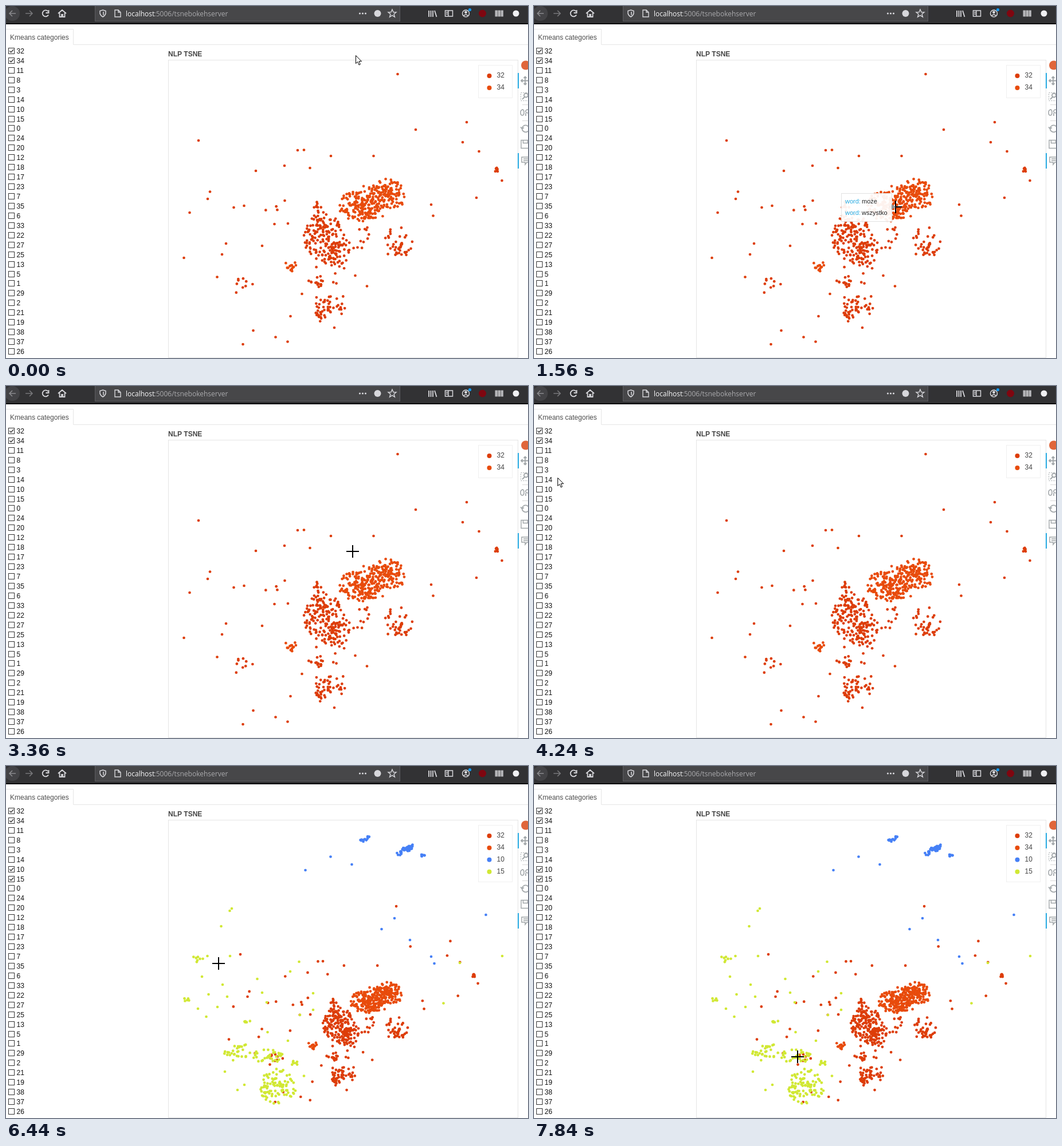
An HTML page with a canvas for the animation above (8 s loop, 911x615 px).

```html
<!DOCTYPE html>
<html lang="en">
<head>
<meta charset="utf-8">
<title>NLP TSNE</title>
<style>
html, body { margin: 0; width: 100%; height: 100%; overflow: hidden; background: #fff; }
canvas { display: block; }
</style>
</head>
<body>
<canvas id="stage" width="911" height="615"></canvas>
<script>
const ctx = document.getElementById('stage').getContext('2d');
const LOOP = 8000, STEP = 40, TAU = Math.PI * 2;
const SANS = '"Liberation Sans", Arial, sans-serif';
const COLORS = { 32: '#dd3d08', 34: '#e84b0c', 10: '#4680f6', 15: '#d1e834' };
const LABELS = '32 34 11 8 3 14 10 15 0 24 20 12 18 17 23 7 35 6 33 22 27 25 13 5 1 29 2 21 19 38 37 26'.split(' ');

// Axis ranges as [x offset, x scale, y offset, y scale]
const VIEWS = [
  [0, 1, 0, 1],
  [10.84, 0.9651, 159, 0.731],
  [145.9, 0.783, 158.8, 0.7246]
];

// When each category is ticked, and when its points arrive
const TICKS = { 32: 0, 34: 0, 10: 4880, 15: 5640 };
const ARRIVE = { 32: 0, 34: 0, 10: 5000, 15: 5720 };

// Loose points, x and y in turn
const LOOSE_RED = [
  683.5,119, 715,216, 804,203, 797,238, 825.5,254, 865.5,305, 821,335, 742,347, 745.5,366.5,
  641.5,262, 567,262, 509,252, 520,251.5, 486,279, 530.5,283, 436,288, 356,324.5, 352,337,
  397.5,352, 415.5,349, 486.5,340, 320.5,361, 468.5,381, 492,380, 384,415, 447,419, 377,434,
  310.5,440, 368.5,473.5, 516.5,503, 609.5,471, 630,489.5, 496.5,542, 431.5,567, 470.5,578.5,
  491.5,586.5, 413.5,591, 573,562, 336,235
];
const LOOSE_BLUE = [522.5,182, 566.5,158.5, 603.5,172, 678,266, 655.5,285, 705,304, 742,333, 747.5,345, 837.5,260];
const LOOSE_LIME = [
  394,249, 390.5,253, 375.5,280, 351.5,332, 391,332, 342,368, 378,382, 353.5,399, 369,421,
  335,424, 349.5,438, 386,403, 438.5,372, 447,396, 455,413, 511.5,342, 496,359, 536,397,
  536,426, 513,435, 866,332, 792,344, 763.5,414.5, 456.5,465, 492,480, 382,534, 416,557,
  404,566, 520,541.5
];

// Clouds: centre, radii, count
const CLOUDS = {
  32: [
    [558, 408, 40, 42, 145], [578, 432, 22, 20, 34], [545, 365, 14, 26, 22], [684, 413, 26, 28, 40],
    [548, 486, 9, 7, 11], [554, 526, 19, 26, 40], [584, 520, 8, 20, 10], [555, 468, 45, 20, 12],
    [622, 400, 32, 28, 12], [412, 488, 20, 22, 9], [464, 354, 12, 6, 3], [856, 287, 4, 5, 8]
  ],
  34: [[620, 349, 40, 28, 150], [664, 329, 34, 27, 100], [645, 342, 50, 30, 50], [497, 456, 12, 14, 15]],
  10: [[627, 127, 11, 4, 16], [696, 147, 15, 6, 44], [727, 156, 5, 2, 7]],
  15: [
    [405, 500, 24, 16, 28], [458, 507, 27, 13, 32], [475, 560, 33, 31, 95], [503, 520, 9, 5, 7],
    [334, 339, 11, 7, 7], [315, 408, 5, 4, 5], [421, 446, 8, 2, 5]
  ]
};

// Pointer path: time, x, y
const PATH = [
  [0, 610, 86], [40, 610, 86], [800, 626, 343], [1320, 626, 343], [1560, 631, 351],
  [1840, 646, 361], [2160, 662, 340], [2360, 668, 340], [3000, 681, 322], [3040, 681, 322],
  [3200, 684, 314], [3880, 299, 200], [4240, 41, 160], [4520, 8, 181], [5080, 8, 181],
  [5560, 10, 197], [5920, 10, 197], [6440, 371, 345], [6760, 460, 499], [6960, 428, 506],
  [7240, 456, 507], [7680, 456, 507], [7840, 460, 508], [8000, 460, 508]
];

// Hover tips: start, end, words
const TIPS = [
  [720, 1720, ['może', 'wszystko']],
  [2040, 2680, ['z', 'przed']],
  [6880, 7840, ['człowiek']]
];

let seed = 11;
function random() {
  seed = (seed * 16807) % 2147483647;
  return seed / 2147483647;
}

function makePoints() {
  const sets = { 32: [], 34: [], 10: [], 15: [] };
  // Blue and lime are given in the last view, so they are mapped back
  const add = (cat, x, y) => {
    const [ox, sx, oy, sy] = VIEWS[cat < 20 ? 2 : 0];
    sets[cat].push([(x - ox) / sx, (y - oy) / sy]);
  };
  const addAll = (cat, list) => {
    for (let i = 0; i < list.length; i += 2) add(cat, list[i], list[i + 1]);
  };
  addAll(32, LOOSE_RED);
  addAll(10, LOOSE_BLUE);
  addAll(15, LOOSE_LIME);
  for (const cat in CLOUDS) {
    for (const [cx, cy, rx, ry, n] of CLOUDS[cat]) {
      // Blue clouds lean, except the low flat one
      const lean = cat === '10' && ry > 2 ? -0.5 : 0;
      for (let i = 0; i < n; i++) {
        const a = random() * TAU, r = random() ** 0.6;
        const u = Math.cos(a) * r * rx, v = Math.sin(a) * r * ry;
        add(cat, cx + u, cy + v + u * lean);
      }
    }
  }
  return sets;
}
const POINTS = makePoints();

function rect(x, y, w, h, fill) {
  ctx.fillStyle = fill;
  ctx.fillRect(x, y, w, h);
}
function frame(x, y, w, h, color, width = 1) {
  ctx.strokeStyle = color;
  ctx.lineWidth = width;
  ctx.strokeRect(x, y, w, h);
}
function dot(x, y, r, fill) {
  ctx.fillStyle = fill;
  ctx.beginPath();
  ctx.arc(x, y, r, 0, TAU);
  ctx.fill();
}
function text(s, x, y, color, font = '12px ' + SANS) {
  ctx.font = font;
  ctx.fillStyle = color;
  ctx.fillText(s, x, y);
}
function path(d, color, width = 1.6, x = 0, y = 0) {
  ctx.save();
  ctx.translate(x, y);
  ctx.strokeStyle = color;
  ctx.lineWidth = width;
  ctx.stroke(new Path2D(d));
  ctx.restore();
}

function drawBrowser() {
  const light = '#d7d7db', dim = '#77777a';
  rect(0, 0, 911, 31, '#323234');
  rect(0, 30, 911, 2, '#0c0c0d');
  rect(155, 0, 533, 27, '#5c5c61');
  rect(156, 0, 531, 26, '#474749');
  dot(11, 13, 13, '#434346');
  path('M16 0H5M10-5L5 0l5 5', '#8b8b8e', 1.6, 1, 13);
  path('M-6 0H6M1-5L6 0L1 5', dim, 1.6, 40, 13);
  path('M4.5-3.5A5.5 5.5 0 1 0 5 2.5M5.5-6v5h-5', light, 1.8, 69, 13);
  path('M-7 0L0-6L7 0M-4.5-1V6H-1V2H1V6H4.5V-1', light, 1.8, 98, 13);
  path('M0-6L5-4.5V0Q4 4 0 6Q-4 4-5 0V-4.5Z M1-3v6', light, 1.5, 169, 13);
  path('M-5-6H1L5-2V6H-5ZM1-6V-2H5', light, 1.4, 195, 13);
  const url = '12px "Open Sans", "Noto Sans", sans-serif';
  text('localhost', 209, 18, '#f9f9fa', url);
  text(':5006/tsnebokehserver', 258.5, 18, '#aaaaad', url);
  for (let i = 0; i < 3; i++) dot(617.5 + i * 5, 13, 1.6, light);
  dot(648.5, 13, 6, light);
  path('M0-7L2-2.2L7-2L3 1.3L4.4 6.2L0 3.4L-4.4 6.2L-3 1.3L-7-2L-2-2.2Z', light, 1.4, 674, 13);
  path('M-6-5V6M-2.5-5V6M1-5V6M4-5L7.5 6', light, 1.8, 744, 13);
  path('M-6.5-5h13v10h-13ZM-1-5V5M-5-2h3M-5 1h3', light, 1.5, 773, 13);
  path('M6 0A6 6 0 1 1-6 0A6 6 0 1 1 6 0M-3.5 4Q0 0 3.5 4', light, 1.5, 802.5, 13);
  dot(802.5, 11, 2.4, light);
  dot(809.5, 6.5, 2.6, '#1299f4');
  dot(831.5, 13, 6.5, '#800610');
  for (let i = 0; i < 3; i++) rect(853.5 + i * 5, 7.5, 4.4, 11, '#b5b5b8');
  dot(890, 13, 5.5, '#f0f0f2');
}

function drawList(t, px, py) {
  path('M0 40.5H117.5V67.5H911', '#e6e6e6', 1);
  text('Kmeans categories', 7, 59, '#4d4d4d');
  LABELS.forEach((label, i) => {
    const y = Math.round(73 + i * 16.935);
    const hover = px > 3 && px < 16 && py >= y && py <= y + 12;
    const color = hover ? '#0078d7' : '#333';
    rect(4, y, 11, 11, '#fff');
    frame(4.5, y + 0.5, 10, 10, color);
    if (t >= TICKS[label]) path('M2.5 5.5L4.7 8L9 3', color, 1.3, 4, y);
    text(label, 18.5, y + 10, '#111');
  });
}

function drawPlot(t) {
  const [ox, sx, oy, sy] = VIEWS[t >= ARRIVE[15] ? 2 : t >= ARRIVE[10] ? 1 : 0];
  const shown = ['32', '34', '10', '15'].filter(cat => t >= ARRIVE[cat]);
  text('NLP TSNE', 283, 88, '#444', 'bold 12px ' + SANS);
  frame(283.5, 94.5, 610, 520, '#e5e5e5');
  for (const cat of shown) {
    for (const [x, y] of POINTS[cat]) dot(ox + x * sx, oy + y * sy, 2.35, COLORS[cat]);
  }
  const h = 15 + shown.length * 21;
  rect(825, 103, 59, h, 'rgba(255,255,255,.95)');
  frame(824.5, 103.5, 59, h, '#f0f0f0');
  shown.forEach((cat, i) => {
    dot(843.5, 122 + i * 20.9, 4, COLORS[cat]);
    text(cat, 856.5, Math.round(125 + i * 20.9), '#444');
  });
}

function drawTools() {
  const gray = '#a1a6a9';
  dot(907, 103.5, 8, '#e0663a');
  rect(893, 117, 2, 27, '#26aae1');
  rect(893, 257, 2, 27, '#26aae1');
  rect(901, 172, 10, 1, '#d8d8d8');
  rect(901, 200, 10, 1, '#d8d8d8');
  path('M-7 0H7M0-7V7M-4.5-2.5L-7 0L-4.5 2.5M-2.5-4.5L0-7L2.5-4.5M-2.5 4.5L0 7L2.5 4.5', gray, 1.8, 906, 130.5);
  ctx.setLineDash([2, 2]);
  frame(898.5, 151.5, 14, 14, gray);
  ctx.setLineDash([]);
  path('M4 0A3.5 3.5 0 1 1-3 0A3.5 3.5 0 1 1 4 0M-2 3L-6 7', gray, 1.8, 907, 156);
  path('M-1-5Q-6-5-6 0Q-6 5-3 5Q0 5 0 0Q0-5-3-5M3 6V1M8-5Q2-5 3-1Q4 1 8 1', gray, 1.6, 904, 186);
  path('M6-3A6 6 0 1 0 5 4M-8-3L-5.5 0L-2-2', gray, 1.7, 906, 214.5);
  path('M-6.5-7H7V7H-6.5ZM-3-7V-2H5V-7', gray, 1.4, 905.5, 241.5);
  path('M-6-6H7V3H3L0 7V3H-6ZM-3-3H7M-3 0H7', gray, 1.5, 906, 270);
}

function drawTip(words, x, y) {
  const font = '11px ' + SANS;
  ctx.font = font;
  const w = Math.round(43 + Math.max(...words.map(s => ctx.measureText(s).width)));
  const h = words.length * 19.5 + 10;
  const right = x < 588;
  const left = Math.round(right ? x + 7 : x - 7 - w), top = Math.round(y - h / 2);
  rect(left, top, w, h, 'rgba(255,255,255,.93)');
  frame(left + 0.5, top + 0.5, w, h, '#e2e2e2');
  const base = right ? left : left + w, tip = right ? base - 7 : base + 7;
  ctx.fillStyle = '#909599';
  ctx.beginPath();
  ctx.moveTo(base, y - 5);
  ctx.lineTo(tip, y);
  ctx.lineTo(base, y + 5);
  ctx.fill();
  words.forEach((s, i) => {
    const row = top + 18 + i * 20;
    text('word:', left + 7, row, '#26aae1', font);
    text(s, left + 36, row, '#222', font);
  });
}

function drawPointer(x, y) {
  if (x > 283 && x < 893 && y > 95) {
    rect(x - 11, y - 1, 22, 2, '#000');
    rect(x - 1, y - 11, 2, 22, '#000');
    return;
  }
  const arrow = new Path2D('M.5 .5V14.5L3.7 11.5L6 17L8.3 16L6 10.7H10.5Z');
  ctx.save();
  ctx.translate(x, y);
  ctx.fillStyle = '#fff';
  ctx.fill(arrow);
  ctx.strokeStyle = '#000';
  ctx.lineWidth = 1;
  ctx.stroke(arrow);
  ctx.restore();
}

// Smooth curve through the path, with zero speed beside each rest
function pointerAt(t) {
  let i = 0;
  while (i < PATH.length - 2 && t >= PATH[i + 1][0]) i++;
  const still = (a, b) => !a || !b || (a[1] === b[1] && a[2] === b[2]);
  const speed = (k, axis) => {
    const a = PATH[k - 1], b = PATH[k], c = PATH[k + 1];
    return still(a, b) || still(b, c) ? 0 : (c[axis] - a[axis]) / (c[0] - a[0]);
  };
  const a = PATH[i], b = PATH[i + 1], d = b[0] - a[0], u = (t - a[0]) / d;
  return [1, 2].map(axis => {
    const ease = u * u * (3 - 2 * u);
    return Math.round(a[axis] + (b[axis] - a[axis]) * ease
      + d * u * (1 - u) * ((1 - u) * speed(i, axis) - u * speed(i + 1, axis)));
  });
}

function draw(now) {
  const t = Math.floor((now % LOOP) / STEP) * STEP;
  const [x, y] = pointerAt(t);
  rect(0, 0, 911, 615, '#fff');
  drawBrowser();
  drawList(t, x, y);
  drawPlot(t);
  drawTools();
  drawPointer(x, y);
  for (const [from, to, words] of TIPS) if (t >= from && t < to) drawTip(words, x, y);
  requestAnimationFrame(draw);
}
requestAnimationFrame(draw);
</script>
</body>
</html>
```
